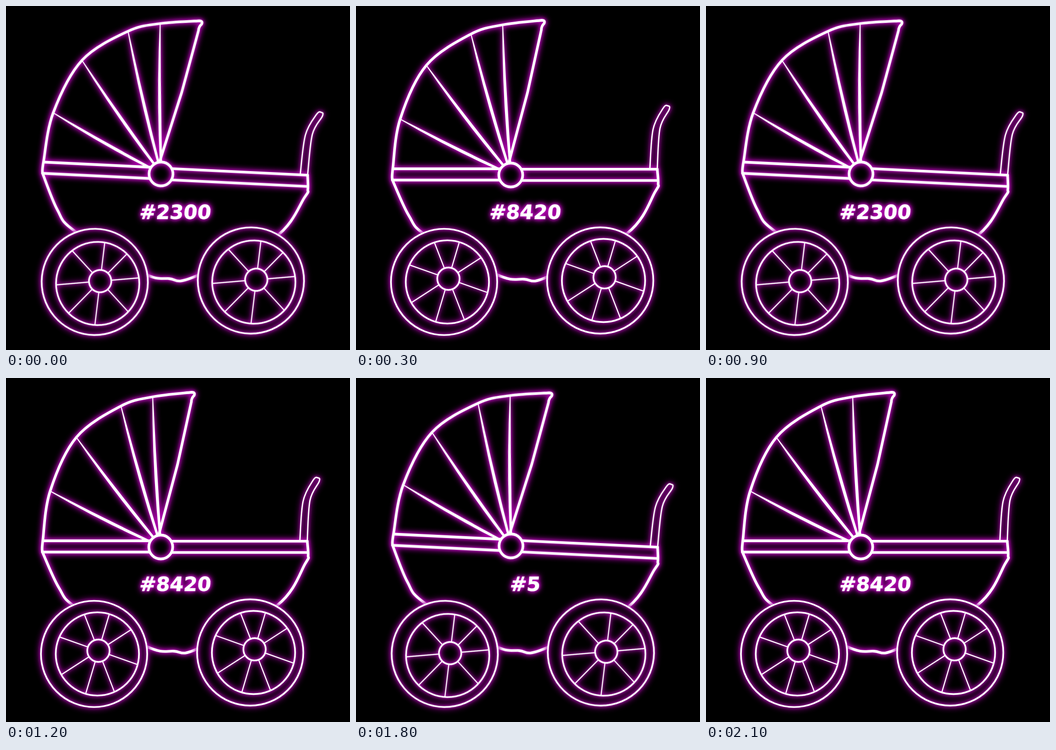
Recreate the animation shown at these times as an HTML page. Size 748 by 748 pixels, loop 2400 ms.

```html
<!DOCTYPE html>
<html lang="en">
<head>
<meta charset="utf-8">
<title>Neon pram</title>
<style>
html, body { margin: 0; width: 100%; height: 100%; overflow: hidden; background: #000; }
svg { display: block; width: 100vw; height: 100vh; }
path, circle { fill: none; stroke: #fff; stroke-linecap: round; stroke-linejoin: round; }
.frame { stroke-width: 5.8; }
.rib { fill: #fff; stroke-width: 2; }
.rim { stroke-width: 3.7; }
.spoke { stroke-width: 2.5; }
.tyre { fill: #000; stroke: none; }
.handle { stroke-width: 3; }
text { font: bold 43px "DejaVu Sans", sans-serif; fill: #fff; stroke: #fff; stroke-width: .8px; text-anchor: middle; }
</style>
</head>
<body>
<svg viewBox="0 0 748 748">
  <defs>
    <filter id="glow" filterUnits="userSpaceOnUse" x="-400" y="-400" width="1500" height="1500" color-interpolation-filters="sRGB">
      <feGaussianBlur in="SourceAlpha" stdDeviation="7"/>
      <feColorMatrix values="0 0 0 0 .62  0 0 0 0 0  0 0 0 0 .62  0 0 0 2.1 0" result="halo"/>
      <feGaussianBlur in="SourceAlpha" stdDeviation="3"/>
      <feColorMatrix values="0 0 0 0 .66  0 0 0 0 0  0 0 0 0 .66  0 0 0 1.2 0"/>
      <feMerge><feMergeNode in="halo"/><feMergeNode/><feMergeNode in="SourceGraphic"/></feMerge>
    </filter>
  </defs>
  <g id="body" filter="url(#glow)"></g>
  <g id="wheels"></g>
  <g transform="translate(368 463) skewX(-5)" filter="url(#glow)"><text id="label" x="-1"></text></g>
</svg>
<script>
const byId = id => document.getElementById(id);
const path = (kind, d) => `<path class="${kind}" d="${d}"/>`;
const circle = (kind, x, y, r) => `<circle class="${kind}" cx="${x}" cy="${y}" r="${r}"/>`;

// Catmull-Rom curve through the points.
function smooth(points) {
  const at = i => points[Math.max(0, Math.min(points.length - 1, i))];
  const handle = (i, sign) => at(i).map((v, axis) => v + sign * (at(i + 1)[axis] - at(i - 1)[axis]) / 6);
  return "M" + points[0] + points.slice(1).map((p, i) => `C${handle(i, 1)} ${handle(i + 1, -1)} ${p}`).join("");
}

const hub = { x: 336.5, y: 367.5, r: 26 };
const ribTips = [[96, 246], [153, 129], [250, 61], [319, 41]];
const hood = [[79, 378], [80, 354], ...ribTips, [404, 31]];
const hull = [[79, 378], [115, 456], [154, 500], [306, 584], [365, 594], [416, 589], [590, 494], [651, 403], [657, 386], [655, 355]];
const grip = [[639, 353], [646, 268], [668, 222], [678, 217], [681, 225], [661, 266], [655, 355]];

// A rib points at the hub, sags a little and widens from its tip to its foot.
function rib([x, y]) {
  const length = Math.hypot(hub.x - x, hub.y - y);
  const ux = (hub.x - x) / length, uy = (hub.y - y) / length;
  const point = (along, aside) => `${x + ux * along - uy * aside} ${y + uy * along + ux * aside}`;
  const foot = length - hub.r, mid = foot / 2;
  return path("rib", `M${x} ${y}Q${point(mid, 8)} ${point(foot, 1.6)}L${point(foot, -1.6)}Q${point(mid, 1)} ${x} ${y}Z`);
}

// The stripe stops at both sides of the hub.
const stripe = [354, 378.5].map(y => `M81 ${y}H${hub.x - hub.r + 2}M${hub.x + hub.r - 2} ${y + .8}H655`).join("");

byId("body").innerHTML =
  path("frame", smooth(hood) + "Q412 31 409 38Q403 44 403 52L373 188L333 338") +
  path("frame", smooth(hull)) + path("frame", stripe) + path("handle", smooth(grip)) +
  ribTips.map(rib).join("") + circle("frame", hub.x, hub.y, hub.r);

// The inner rim and the hub sit off the tyre's centre, so a turning wheel wobbles.
const inner = { x: 7.2, y: 0, r: 90.5 }, nave = { x: 9.5, y: -7, r: 24.3 };
function spoke(k) {
  const angle = (198 + 45 * k + 6 * Math.sin(k * Math.PI / 2 + .25)) * Math.PI / 180;
  const ux = Math.cos(angle), uy = Math.sin(angle);
  const dx = nave.x - inner.x, dy = nave.y - inner.y, dot = dx * ux + dy * uy;
  const reach = Math.sqrt(inner.r ** 2 - dx * dx - dy * dy + dot * dot) - dot;
  const point = t => `${nave.x + ux * t} ${nave.y + uy * t}`;
  return `M${point(nave.r)}L${point(reach)}`;
}
const spokes = Array.from({ length: 8 }, (_, k) => spoke(k)).join("");
const wheel = x => `<g transform="translate(${x} ${-x * .009})"><g class="wheel">${circle("tyre", 0, 0, 115)}
  <g filter="url(#glow)">${circle("rim", 0, 0, 115.5)}${circle("rim", inner.x, inner.y, inner.r)}
  ${circle("rim", nave.x, nave.y, nave.r)}${path("spoke", spokes)}</g></g></g>`;
byId("wheels").innerHTML = wheel(0) + wheel(339.5);
const wheels = document.querySelectorAll(".wheel");

const poses = [
  { tilt: 2.75, slope: 0, spin: 28, axle: "193 600" },
  { tilt: 0, slope: 0, spin: 0, axle: "191.5 600" },
  { tilt: -4.6, slope: -6.8, spin: 208, axle: "222 619" }
];
const labels = ["#2300", "#8420", "#3120", "#2300", "#8420", "#867", "#5", "#8420"];
const STEP = 300;

function draw(time) {
  const step = Math.floor(time / STEP) % labels.length;
  const { tilt, slope, spin, axle } = poses[step % poses.length];
  byId("body").setAttribute("transform", `rotate(${tilt} 385 378)`);
  byId("wheels").setAttribute("transform", `translate(${axle}) rotate(${slope})`);
  wheels.forEach(w => w.setAttribute("transform", `rotate(${spin})`));
  byId("label").textContent = labels[step];
}

const start = performance.now();
function tick() {
  draw(performance.now() - start);
  requestAnimationFrame(tick);
}
tick();
</script>
</body>
</html>
```
